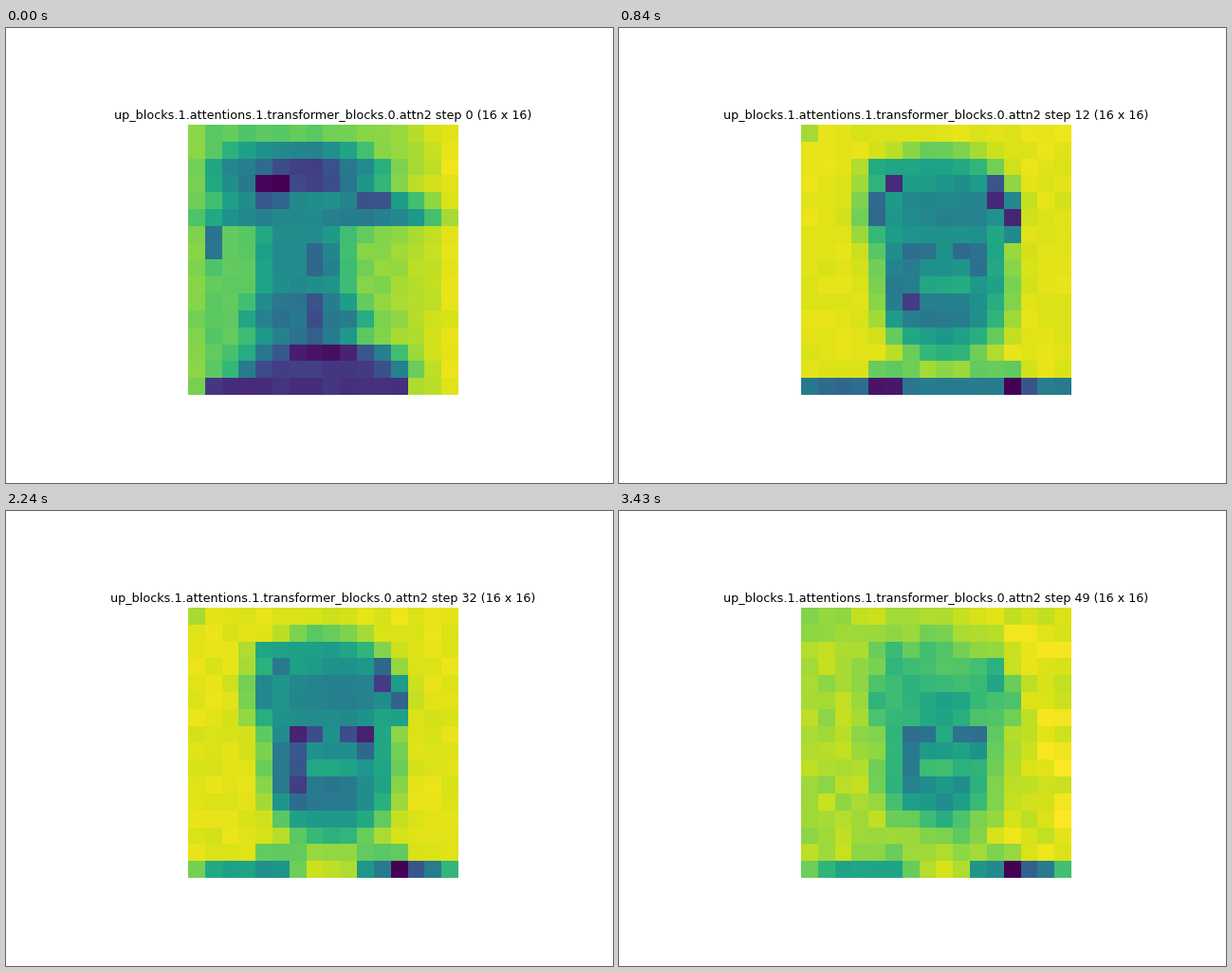
A matplotlib script for the animation above (3500 ms loop, 640 by 480 pixels).

```python
import numpy as np
import matplotlib.pyplot as plt
from matplotlib.animation import FuncAnimation

STEPS, INTERVAL, SIZE = 50, 70, 16
LAYER = "up_blocks.1.attentions.1.transformer_blocks.0.attn2"
DPI, WIDTH, HEIGHT = 100, 640, 480
LEFT, TOP, SIDE = 192, 102, 285

COL, ROW = np.meshgrid(np.arange(SIZE), np.arange(SIZE))
GRAIN = np.random.default_rng(4).uniform(-1, 1, (6, SIZE, SIZE))


def ramp(step, start, end):
    return np.clip((step - start) / (end - start), 0, 1)


def mix(a, b, amount):
    return a + (b - a) * amount


def blob(x, y, rx, ry):
    """Ellipse mask with a flat middle and a soft edge."""
    d2 = ((COL - x) / rx) ** 2 + ((ROW - y) / ry) ** 2
    return np.exp(-d2 ** 3)


def shade(grid, tone, x, y, rx=.5, ry=.5):
    grid += (tone - grid) * blob(x, y, rx, ry)


def opening_map():
    """Figure with a wide hat and dark coat, brighter to the right."""
    grid = .76 + .2 * (COL / 15) ** 3 + .06 * (COL == 0)
    shade(grid, .44, 6, 2.4, 5.3, 1.9)       # hat
    shade(grid, .24, 6.4, 2.5, 2.6, .9)
    shade(grid, .05, 4.5, 3, .8)
    shade(grid, .47, 7.5, 4.7, 7, 1.2)       # brim
    for x in (4.5, 10.5):
        shade(grid, .3, x, 4, .8)
    shade(grid, .57, 7, 4, 1.1)
    shade(grid, .4, 1, 6.5, .5, .8)
    shade(grid, .52, 6.3, 8, 2.7, 4.2)       # neck
    shade(grid, .34, 7.3, 7.5, .8, .8)
    shade(grid, .43, 6.5, 11, 3.6, 1.7)      # coat
    shade(grid, .3, 7, 10.8, .8, 1.3)
    shade(grid, .23, 7.5, 14, 5, 1.8)
    shade(grid, .12, 7.5, 13, 1.9)
    return grid


def portrait_map(step):
    early, settle = 1 - ramp(step, 6, 12), ramp(step, 6, 36)

    grid = np.full((SIZE, SIZE), mix(.955, .925, early))
    shade(grid, .87, 0, 0)
    shade(grid, mix(.955, .79, early), 2.4, 5, 1.7, 3.6)
    shade(grid, .52, 7.6, 4.6, 4.6, 3.75)    # skull
    shade(grid, .52, 8, 9, 4, 4.8)           # jaw
    shade(grid, mix(.58, .36, early), 5.7, 2.3, 2.6, .9)
    shade(grid, .46, 8.5, 4.5, 3, 1.4)       # forehead
    shade(grid, .43, 5.5, 9, 1, 2.6)         # cheek and nose
    shade(grid, mix(.48, .26, settle), 6, 9, .5, 2.6)
    shade(grid, .62, 8, 9, 1.4, .6)
    shade(grid, .42, 8, 10.6, 2.2, 1.1)      # mouth and chin
    shade(grid, .2, 6, 10)
    for side in (-1, 1):
        shade(grid, mix(.4, .25, settle), 8 + side, 7)
        shade(grid, mix(.45, .08, settle), 8 + 2 * side, 7)
        shade(grid, mix(.76, .3, early), 8 + 3 * side, 14, 1.7, mix(.55, 1.1, early))
    shade(grid, .36, 10, 8)
    shade(grid, mix(.02, .48, settle), 5, 3)  # temples and ear
    shade(grid, mix(.3, .52, settle), 4, 4.5, .5, .9)
    shade(grid, mix(.07, .22, settle), 11, 3.6, .5, .7)
    shade(grid, mix(.05, .4, settle), 12, 5, .5, 1.05)

    # The outline pales first, while the inner face holds its tone.
    pale = ramp(step, 39, 49) * (.55 - .3 * blob(8, 8.5, 2.4, 4))
    grid += (.955 - grid) * pale
    return grid - .09 * (1 - COL / 15) * ramp(step, 36, 49)


def shoulders(grid, step):
    settle = ramp(step, 12, 34)
    grid[-1] = mix(.1, .92, ramp(step, 4, 24))
    shade(grid, mix(.35, .62, settle), 3, 15, 3, .5)
    shade(grid, mix(.04, .58, settle), 4.5, 15, .8)
    shade(grid, .43, 12.3, 15, 2.9, .5)
    shade(grid, .02, 12.3, 15, .7)


def attention(step):
    grid = portrait_map(step)
    shoulders(grid, step)
    start = opening_map()
    start[-1, 1:13] = .2
    grid = mix(start, grid, ramp(step, 0, 6))
    phase = step / 10
    i = int(phase)
    grain = mix(GRAIN[i], GRAIN[i + 1], phase - i)
    grid += grain * mix(.02, .05, ramp(step, 38, 49))
    grid = np.clip(grid, 0, 1)
    return (grid - grid.min()) / (1 - grid.min())


fig = plt.figure(figsize=(WIDTH / DPI, HEIGHT / DPI), dpi=DPI, facecolor="white")
ax = fig.add_axes([LEFT / WIDTH, 1 - (TOP + SIDE) / HEIGHT,
                   SIDE / WIDTH, SIDE / HEIGHT])
ax.axis("off")
image = ax.imshow(attention(0), cmap="viridis", vmin=0, vmax=1,
                  interpolation="nearest", aspect="auto")
title = ax.set_title("", fontsize=9.2, pad=4.6, family="DejaVu Sans")


def update(step):
    image.set_data(attention(step))
    title.set_text(f"{LAYER} step {step} ({SIZE} x {SIZE})")
    return image, title


anim = FuncAnimation(fig, update, frames=STEPS, interval=INTERVAL,
                     repeat=True, repeat_delay=0)
plt.show()
```
